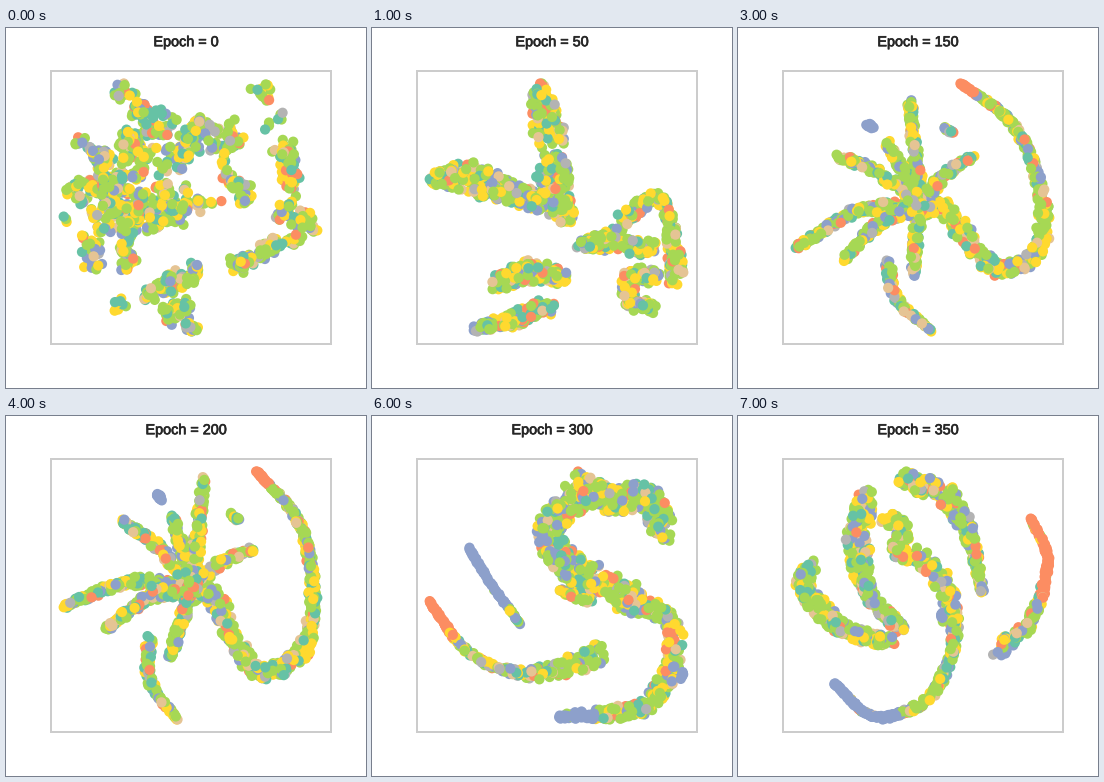
Recreate the animation shown at these times as a matplotlib script. Size 360x360 px, loop 8 s.

```python
import numpy as np
import matplotlib.pyplot as plt
from matplotlib import patheffects
from matplotlib.animation import FuncAnimation
from matplotlib.colors import to_rgba_array
from matplotlib.patches import Rectangle

plt.rcParams["font.family"] = "Liberation Sans"

SIZE, DPI = 360, 72
POINTS = 1400
STEP = 50  # epochs between pictures
LOW, HIGH = np.array([57.7, 55.5]), np.array([311.3, 303.5])

TEAL, ORANGE, BLUE, GREEN, YELLOW, TAN, GRAY = range(7)
PALETTE = to_rgba_array(["#66c2a5", "#fc8d62", "#8da0cb", "#a6d854",
                         "#ffd92f", "#e5c494", "#b3b3b3"])
SHARES = [0.12, 0.07, 0.12, 0.40, 0.18, 0.07, 0.04]


def smooth(keys, steps=60):
    """A Hermite curve through the key points."""
    keys = np.array(keys, float)
    slopes = np.gradient(keys, axis=0)
    u = np.linspace(0, len(keys) - 1, steps)
    i = np.minimum(u.astype(int), len(keys) - 2)
    s = (u - i)[:, None]
    return ((1 + 2 * s) * (1 - s) ** 2 * keys[i] + s * (1 - s) ** 2 * slopes[i]
            + s * s * (3 - 2 * s) * keys[i + 1] - s * s * (1 - s) * slopes[i + 1])


class Band:
    """A curved strip of points; w holds its half widths from start to end.

    tint = (colour, from, to) favours one colour on part of the strip.
    """

    def __init__(self, *keys, w=(4,), tint=None):
        self.path, self.w, self.tint = smooth(keys), w, tint
        steps = np.hypot(*np.diff(self.path, axis=0).T)
        self.dist = np.r_[0, np.cumsum(steps)]
        girth = np.mean(w) + 4
        self.weight = girth * (self.dist[-1] + girth)

    def sample(self, n, rng):
        t = (np.arange(n) + rng.random(n)) / n
        centre = [np.interp(t * self.dist[-1], self.dist, axis)
                  for axis in self.path.T]
        width = np.interp(t, np.linspace(0, 1, len(self.w)), self.w)
        reach = width * np.sqrt(rng.random(n))
        angle = rng.uniform(0, 2 * np.pi, n)
        spots = np.column_stack([centre[0] + reach * np.cos(angle),
                                 centre[1] + reach * np.sin(angle)])
        hues = rng.choice(len(SHARES), n, p=SHARES)
        if self.tint:
            hue, start, stop = self.tint
            inside = (t >= start) & (t <= stop) & (rng.random(n) < 0.96)
            hues[inside] = hue
        return spots, hues


def tangle():
    return [
        Band((88, 140), (145, 130), (208, 105), w=(28, 32, 16)),
        Band((95, 180), (150, 170), (203, 180), w=(22, 26, 22)),
        Band((128, 70), (165, 92), w=(8, 10)),
        Band((98, 200), (106, 240), (128, 268), w=(9, 7, 4)),
        Band((134, 195), (132, 238), w=(10,)),
        Band((150, 256), (185, 242), (212, 230), w=(11, 9, 6)),
        Band((188, 250), (188, 288), w=(10, 14)),
        Band((265, 60), (276, 100), (293, 157), w=(8, 11, 7)),
        Band((240, 100), (226, 135), (255, 178), w=(11, 9, 6)),
        Band((275, 172), (297, 195), (280, 213), (230, 235), w=(7, 14, 8, 8)),
    ]


def clusters():
    return [
        Band((168, 62), (172, 85), (179, 110), w=(6, 15, 17)),
        Band((186, 132), (180, 160), (195, 185), w=(15, 18, 9)),
        Band((64, 149), (95, 148), (130, 158), (168, 172), w=(6, 17, 12, 9)),
        Band((208, 213), (242, 206), w=(4, 13)),
        Band((252, 187), (286, 167), (300, 212), (302, 247), w=(9, 5, 6, 9)),
        Band((253, 214), (280, 216), w=(8,)),
        Band((285, 244), (258, 242), (259, 267), (280, 272), w=(9, 9, 7, 6)),
        Band((127, 249), (160, 238), (190, 244), w=(8, 12, 9)),
        Band((105, 293), (140, 284), (178, 270), w=(3, 9, 9)),
    ]


def arcs():
    return [
        Band((190, 57), (148, 85), (128, 130), w=(3, 6, 7)),
        Band((134, 140), (165, 137), (202, 108), (237, 115), (257, 151),
             w=(8, 8, 10, 9, 2)),
        Band((190, 140), (220, 122), w=(4,)),
        Band((95, 98), (84, 125), w=(4,)),
        Band((60, 140), (74, 130), (97, 142), w=(4,)),
        Band((66, 172), (77, 182), (83, 210), w=(6, 5, 4)),
        Band((140, 165), (137, 198), (200, 193), (267, 175), (311, 126),
             w=(6, 6, 8, 7, 2)),
        Band((272, 192), (282, 186)),
        Band((139, 220), (165, 236), (208, 237), (250, 210), w=(5, 8, 9, 3)),
        Band((210, 299), (213, 286), (224, 284), w=(3,)),
        Band((236, 281), (258, 276), w=(5, 8)),
    ]


def spider():
    hub = np.array([188, 172])
    tips = [(59, 191), (101, 213), (117, 106), (168, 102),
            (199, 65), (250, 134), (166, 241)]
    arms = []
    for tip in tips:
        reach = tip - hub
        lift = (0, -0.12 * abs(reach[0]))  # sideways arms arch upwards
        arms.append(Band(hub, hub + reach / 2 + lift, tip, w=(6, 5, 3)))
    return arms + [
        Band((150, 173), (214, 180), w=(6, 9)),
        Band((145, 222), (145, 262), (173, 302), w=(4, 4, 1)),
        Band((153, 80), (157, 86), w=(2,), tint=(BLUE, 0, 1)),
        Band((226, 98), (234, 106), w=(2,)),
        Band((252, 57), (294, 108), (308, 175), (296, 236), (250, 252),
             (215, 190), w=(1, 3, 4, 8, 9, 10), tint=(ORANGE, 0, 0.06)),
    ]


def snake():
    return [
        Band((98, 129), (120, 164), (149, 203), w=(1,), tint=(BLUE, 0, 0.8)),
        Band((59, 181), (98, 230), (150, 250), (200, 242), (230, 230),
             w=(1, 2, 3, 8, 11), tint=(ORANGE, 0, 0.2)),
        Band((205, 68), (245, 85), (272, 78), (292, 114), w=(13,)),
        Band((208, 78), (178, 112), (200, 148), (265, 178), w=(14, 13, 16, 12)),
        Band((188, 170), (218, 180), w=(3, 6)),
        Band((245, 186), (285, 190), (302, 220), (275, 280), (188, 292),
             w=(8, 8, 10, 7, 2), tint=(BLUE, 0.85, 1)),
        Band((310, 249), (308, 255), w=(1,), tint=(BLUE, 0, 1)),
    ]


def hooks():
    return [
        Band((95, 265), (137, 299), (190, 280), (217, 220), (200, 155),
             (160, 132), w=(1, 2, 4, 4, 11, 9), tint=(BLUE, 0, 0.28)),
        Band((294, 101), (311, 145), (292, 205), (261, 231), w=(1, 2, 5, 9),
             tint=(ORANGE, 0, 0.55)),
        Band((164, 62), (210, 80), (234, 125), (245, 175), w=(9, 11, 6, 2)),
        Band((128, 78), (121, 115), (127, 170), (163, 212),
             w=(9, 14, 6, 6)),
        Band((148, 100), (166, 112), (156, 134), w=(7,)),
        Band((72, 147), (66, 172), (105, 211), (152, 224), w=(7, 11, 7, 6)),
        Band((204, 195), (205, 204), w=(1,), tint=(BLUE, 0, 1)),
    ]


def cloud(bands, seed, clumps=0, turn=0):
    """Fill the bands in proportion to their area and fit them to the frame."""
    rng = np.random.default_rng(seed)
    total = sum(band.weight for band in bands)
    parts = [band.sample(int(POINTS * band.weight / total) + 4, rng)
             for band in bands]
    spots = np.vstack([part[0] for part in parts])
    hues = np.concatenate([part[1] for part in parts])
    if clumps:
        homes = rng.choice(len(spots), clumps, replace=False)
        spots = (spots[rng.choice(homes, len(spots))]
                 + rng.normal(0, 3, spots.shape))
    c, s = np.cos(turn), np.sin(turn)
    spots = spots @ np.array([[c, s], [-s, c]])
    low, high = spots.min(axis=0), spots.max(axis=0)
    spots = LOW + (spots - low) / (high - low) * (HIGH - LOW)
    order = rng.permutation(len(spots))
    return spots[order], PALETTE[hues[order]]


clouds = [
    cloud(tangle(), 1, clumps=220),
    cloud(clusters(), 2),
    cloud(arcs(), 3),
    cloud(spider(), 4, turn=-0.2),
    cloud(spider(), 5),
    cloud(snake(), 6, turn=0.2),
    cloud(snake(), 7),
    cloud(hooks(), 8),
]

fig = plt.figure(figsize=(SIZE / DPI, SIZE / DPI), dpi=DPI, facecolor="white")
ax = fig.add_axes([0, 0, 1, 1])
ax.set(xlim=(0, SIZE), ylim=(SIZE, 0))
ax.axis("off")
ax.add_patch(Rectangle((45, 43), 280, 273, fill=False, ec="#cccccc", lw=2))
dots = ax.scatter([], [], s=105, linewidths=0, zorder=3)
title = fig.text(0.5, 0.98, "", size=14.4, color="#262626", ha="center",
                 va="top")
title.set_path_effects([patheffects.withStroke(linewidth=0.7,
                                               foreground="#262626")])


def update(i):
    spots, colours = clouds[i]
    dots.set_offsets(spots)
    dots.set_facecolors(colours)
    title.set_text(f"Epoch = {i * STEP}")
    return dots, title


anim = FuncAnimation(fig, update, frames=len(clouds), interval=1000,
                     repeat=True, repeat_delay=0, blit=False)
plt.show()
```
